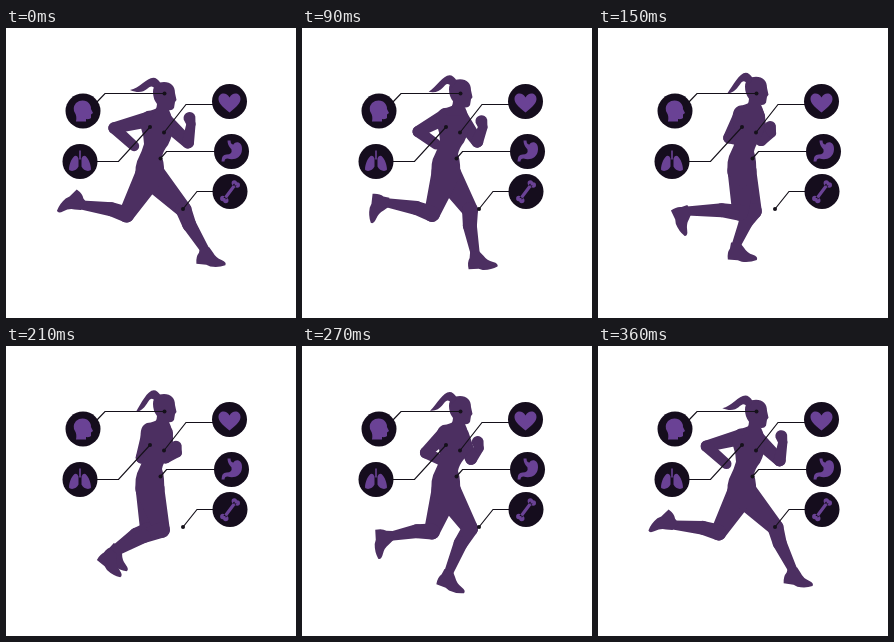
An HTML page with a canvas for the animation above (390 ms loop, 290 px wide and 290 px high).

```html
<!DOCTYPE html>
<html lang="en">
<head>
<meta charset="utf-8">
<title>Runner</title>
<style>
  html, body { margin: 0; width: 100%; height: 100%; overflow: hidden; background: #fff; }
  canvas { display: block; width: 290px; height: 290px; }
</style>
</head>
<body>
<canvas width="290" height="290"></canvas>
<script>
const ctx = document.querySelector('canvas').getContext('2d');
const { sin, cos, PI } = Math;
const BODY = '#4c2f61', DISC = '#150d1d', ICON = '#6a4295', LINE = '#15111a';
const STEP = 30, STEPS = 13;

const HEAD = new Path2D(`M147 64C147 57 152 54 158 54C165 54 169 58 169 65L170.5 72L169 74
  L168 80Q166 83 162 82L164 90L144 90Q151 82 151 76Q147 71 147 64Z`);
const TORSO = new Path2D(`M152 79Q149 82 141 83Q133 86 135 100Q138 108 138 116Q136 123 133 129
  Q128 137 130 152L145 166L158 154Q159 137 156 129Q157 123 162 117Q167 107 167 99Q167 90 163 82Z`);
const SHOE = new Path2D(`M-5 -3L-6 3Q-9 7 -8 14L2 14.5L6 16Q14 17 21 14Q22.5 11 17 9
  Q11 7 8 2L4 -3Z`);

const ICONS = [
  [77, 83, 'M-7 10.5Q-6 5 -8 2Q-11 -3 -7 -8Q-2 -12 4 -9.5Q8 -7 8 -2L10 2L8 3.5V7Q7 8.5 3 8V10.5Z'],
  [223.5, 73.5, 'M0 11C-8 5 -11 1 -11 -2.5C-11 -9 -3 -10 0 -4C3 -10 11 -9 11 -2.5C11 1 8 5 0 11Z'],
  [74, 133.5, `M-1.5 -3C-5 -11 -11 1 -11 8C-9 11 -3 9 -1.5 5ZM1.5 -3C5 -11 11 1 11 8C9 11 3 9 1.5 5Z
    M-.8 -11H.8V-2H-.8Z`],
  [225.5, 123.5, `M-1 -11Q-1 -7 2 -7C4 -11 11 -10 10.5 -2C10 7 2 9 -4 7Q-7 7 -7 10H-10
    Q-10 3 -5 3Q1 3 0 -2Q-4 -6 -4 -11Z`],
  [224, 163.5, `M-6.5 6L4 -8L6.5 -6L-4 8Z
    M-4.5 7a2.7 2.7 0 1 0 -5.4 0a2.7 2.7 0 1 0 5.4 0M-1.5 9a2.7 2.7 0 1 0 -5.4 0a2.7 2.7 0 1 0 5.4 0
    M7 -8.5a2.7 2.7 0 1 0 -5.4 0a2.7 2.7 0 1 0 5.4 0M10 -6.5a2.7 2.7 0 1 0 -5.4 0a2.7 2.7 0 1 0 5.4 0`]
].map(([x, y, d]) => [x, y, new Path2D(d)]);

const CALLOUTS = [
  [158.5, 65.5, 'H99L90 75'], [158, 104.5, 'L180 76.5H207'], [144, 99, 'L112.5 133.5H90'],
  [154.5, 130.5, 'L160.5 123.5H209'], [177, 181, 'L191 163.5H207']
].map(([x, y, d]) => [x, y, new Path2D(`M${x} ${y}${d}`)]);

function disc(x, y, r) {
  ctx.beginPath();
  ctx.arc(x, y, r, 0, 2 * PI);
  ctx.fill();
}

// Tapered limb through [x, y, radius] joints
function limb(...joints) {
  for (let i = 1; i < joints.length; i++) {
    const [x, y, r] = joints[i - 1], [x2, y2, r2] = joints[i];
    const a = Math.atan2(y2 - y, x2 - x), q = PI / 2;
    ctx.beginPath();
    ctx.arc(x, y, r, a + q, a - q);
    ctx.arc(x2, y2, r2, a - q, a + q);
    ctx.fill();
  }
}

// p is the phase of a full stride: 0 reaches forward, PI trails behind
function leg(p, hipY) {
  const kneeX = 149 + 28.5 * cos(p) - 3.5 * sin(p);
  const kneeY = 184 - 2.5 * cos(p);
  const shin = 50 - 65 * cos(p) - 10 * sin(p) - 13 * cos(2 * p);
  const foot = shin + 31 * cos(2 * p) - 8 * sin(2 * p) * (1 - cos(p));
  const length = 46 - 10 * sin(p) ** 5;
  const a = shin * PI / 180;
  // Point on the shin, moved towards the calf by "back"
  const along = (u, back = 0) => [
    kneeX - u * length * sin(a) - back * cos(a),
    kneeY + u * length * cos(a) - back * sin(a)
  ];
  limb([144, hipY, 14.5], [kneeX, kneeY, 8], [...along(.35, 2), 7], [...along(1), 4.5]);
  ctx.save();
  ctx.translate(...along(1));
  ctx.rotate(foot * PI / 180);
  ctx.fill(SHOE);
  ctx.restore();
}

// rise goes from 0 (stride wide open) to 1 (legs passing)
function arms(rise) {
  const w = rise ** 1.5, shoulder = 91 - 6 * rise;
  limb([144, shoulder, 8], [108 + 28 * w, 100 + 12 * w, 5.7], [128 + 21 * w, 118 - 6 * w, 5.2]);
  limb([159, shoulder + 2, 8], [182 - 23 * w, 114.5 - 3 * w, 6],
       [185 - 14 * w, 96 + 11 * w, 4.6], [183.5 - 14 * w, 90 + 11 * w, 6]);
}

function upperBody(rise) {
  ctx.save();
  ctx.translate(0, -6 * rise);
  ctx.fill(TORSO);
  ctx.fill(HEAD);
  ctx.beginPath();
  ctx.moveTo(155, 56);
  ctx.bezierCurveTo(146, 40, 137, 60, 124 + 6 * rise, 62 + 10 * rise);
  ctx.bezierCurveTo(143, 70, 142, 51, 150, 62);
  ctx.fill();
  ctx.restore();
}

function draw(step) {
  const p = PI * step / STEPS, rise = sin(p) ** 2;
  ctx.fillStyle = '#fff';
  ctx.fillRect(0, 0, 290, 290);

  ctx.fillStyle = BODY;
  leg(p, 146 - 3 * rise);
  leg(p + PI, 146 - 3 * rise);
  arms(rise);
  upperBody(rise);

  ctx.strokeStyle = LINE;
  ctx.lineWidth = 1.2;
  for (const [x, y, path] of CALLOUTS) {
    ctx.stroke(path);
    ctx.fillStyle = LINE;
    disc(x, y, 2);
  }
  for (const [x, y, path] of ICONS) {
    ctx.fillStyle = DISC;
    disc(x, y, 17.5);
    ctx.save();
    ctx.translate(x, y);
    ctx.fillStyle = ICON;
    ctx.fill(path);
    ctx.restore();
  }
}

function tick() {
  draw(Math.floor(performance.now() / STEP) % STEPS);
  requestAnimationFrame(tick);
}
tick();
</script>
</body>
</html>
```
